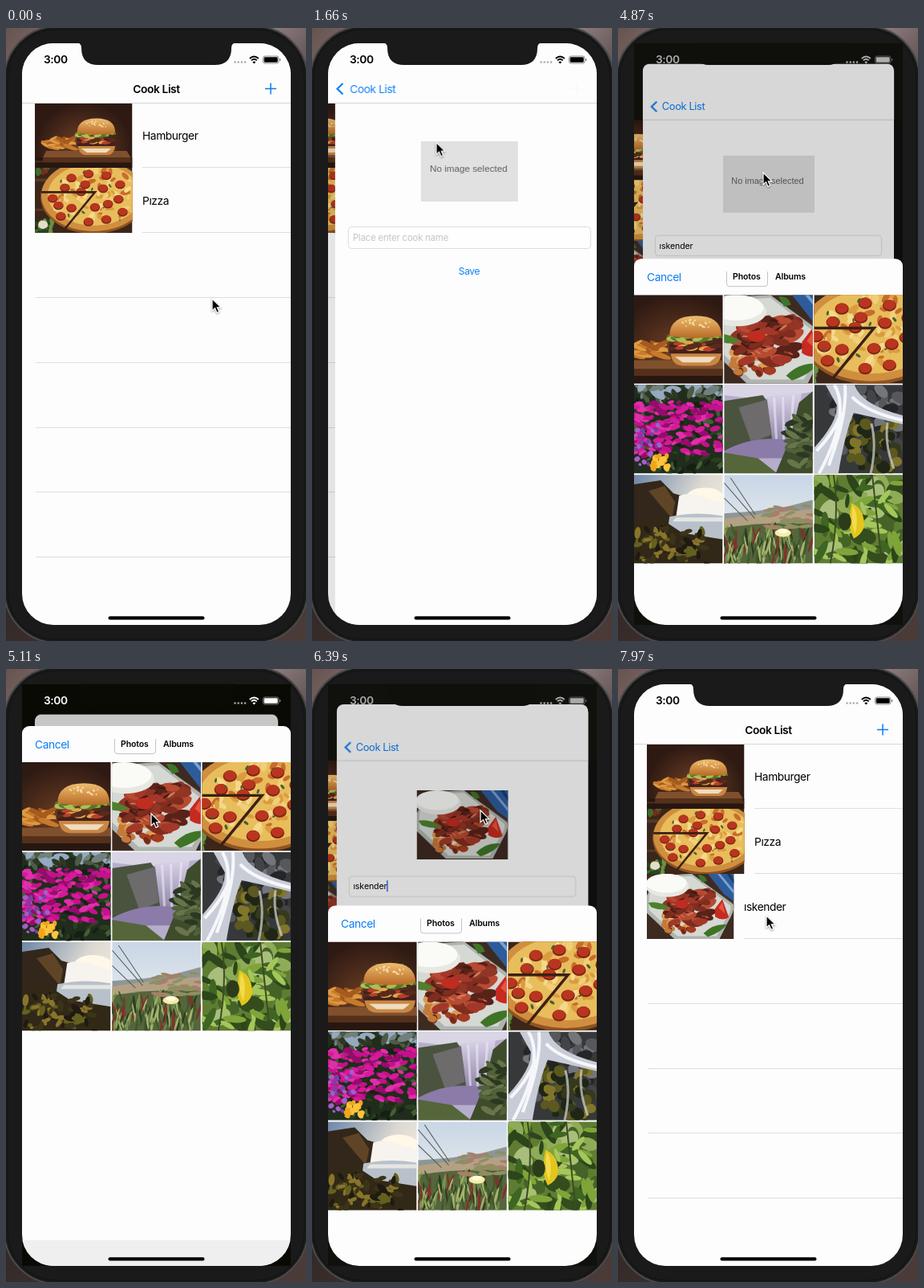
An HTML page for the animation above (8 s loop, 374 by 763 pixels).

```html
<!DOCTYPE html>
<html lang="en">
<head>
<meta charset="utf-8">
<title>Cook List</title>
<style>
  html, body { margin: 0; width: 100%; height: 100%; overflow: hidden; background: #1a1a1a; }
  svg { font-family: Inter, "Open Sans", sans-serif; }
  #stage { display: block; width: 100vw; height: 100vh; }
  .body { font-size: 13.75px; letter-spacing: -.4px; }
  .bold { font-size: 13.75px; letter-spacing: -.38px; font-weight: 600; }
  .small { font-size: 12.1px; letter-spacing: -.4px; }
  .field { font-size: 11.3px; letter-spacing: -.15px; }
  .tab { font-size: 10.5px; letter-spacing: -.12px; font-weight: 600; }
  .hint { font: 11.7px "Liberation Sans", Arial, sans-serif; }
  .blue { fill: #0a7df5; }
  .line { stroke: #dededf; fill: none; }
</style>
</head>
<body>
<svg id="stage" viewBox="0 0 374 763" xmlns="http://www.w3.org/2000/svg">
  <defs>
    <linearGradient id="desk" x2=".6" y2="1">
      <stop offset="0" stop-color="#66534f"/><stop offset=".3" stop-color="#b9a3a6"/><stop offset=".6" stop-color="#2c2422"/><stop offset="1" stop-color="#4a3a38"/>
    </linearGradient>
    <radialGradient id="wall"><stop offset="0" stop-color="#754225"/><stop offset="1" stop-color="#2e1a13"/></radialGradient>
    <linearGradient id="bun" x2="0" y2="1"><stop offset="0" stop-color="#efbd70"/><stop offset="1" stop-color="#b86a26"/></linearGradient>
    <linearGradient id="dusk" x2="1" y2=".5"><stop offset="0" stop-color="#6d86a8"/><stop offset=".6" stop-color="#dcd9d2"/><stop offset="1" stop-color="#f4ede0"/></linearGradient>
    <linearGradient id="fall" x2="0" y2="1"><stop offset="0" stop-color="#d9d3e8"/><stop offset="1" stop-color="#8d82a6"/></linearGradient>
    <linearGradient id="haze" x2="0" y2="1"><stop offset="0" stop-color="#c9d6e6"/><stop offset="1" stop-color="#f3f3f0"/></linearGradient>
    <clipPath id="screen"><rect x="20" y="19" width="335" height="724" rx="39"/></clipPath>
    <path id="notch" d="M89 18.500Q94 19 94 25Q94 46 115 46H260Q281 46 281 25Q281 19 286 18.500Z"/>
  </defs>

  <rect width="374" height="763" fill="url(#desk)"/>
  <rect x="-2" y="-2" width="378" height="767" rx="65" fill="#1a1a1a" stroke="#4b4a4a" stroke-width="2"/>
  <rect x="2" y="2" width="370" height="759" rx="60" fill="none" stroke="#111"/>
  <rect id="dark" x="20" y="19" width="335" height="724" fill="#0b0b06"/>

  <g clip-path="url(#screen)">
    <g id="page">
      <rect x="20" y="19" width="335" height="724" rx="10" fill="#fdfdfd"/>
      <g id="list">
        <path class="line" d="M170 173.500H355M170 254.500H355M37 416.500H355M37 497.500H355M37 577.500H355M37 658.500H355"/>
        <path id="oldLine" class="line" d="M37 335.500H355"/>
        <use href="#burger" x="36" y="93.500" width="121.500" height="80.500"/>
        <use href="#pizza" x="36" y="174" width="121.500" height="81"/>
        <text class="body" x="170" y="139">Hamburger</text>
        <text class="body" x="170" y="219.500">Pızza</text>
        <g id="newRow">
          <path class="line" d="M157 335.500H355"/>
          <use href="#kebab" x="36" y="255" width="108.500" height="81"/>
          <text class="body" x="157" y="300.500">ıskender</text>
        </g>
        <rect id="shade" x="20" y="93" width="500" height="650" fill="#000"/>
      </g>
      <g id="detail">
        <rect x="20" y="93" width="335" height="650" fill="#fdfdfd"/>
        <g id="empty">
          <rect x="127" y="141" width="121" height="75" fill="#e1e1e1"/>
          <text class="hint" x="138" y="179" fill="#606060">No image selected</text>
        </g>
        <use id="chosen" href="#kebab" x="127" y="133" width="121" height="91"/>
        <rect x="36.500" y="247.500" width="302" height="27" rx="4" fill="#fefefe" stroke="#dcdcdc"/>
        <text id="prompt" class="field" x="42" y="265" fill="#c3c3c6">Place enter cook name</text>
        <text id="typed" class="field" x="42" y="265"></text>
        <rect id="caret" x="42" y="253" width="1.600" height="15" fill="#3f6be0"/>
        <text class="small blue" x="187" y="307" text-anchor="middle">Save</text>
      </g>
      <path d="M20 93V29Q20 19 30 19H345Q355 19 355 29V93Z" fill="#fdfdfd"/>
      <path id="tint" d="M20 93V29Q20 19 30 19H341V86Q341 93 348 93Z" fill="#f6f6f6"/>
      <path d="M20 93.500H355" stroke="#d6d6d8"/>
      <g id="listNav">
        <text class="bold" x="187.500" y="80.500" text-anchor="middle">Cook List</text>
      </g>
      <path id="plus" d="M323 75.500H337M330 68.500V82.500" stroke="#0a7df5" stroke-width="1.500"/>
      <path id="chevron" d="M38.500 69L31.500 75.700L38.500 82.500" fill="none" stroke="#0a7df5" stroke-width="2.200"/>
      <text id="back" class="body blue" x="45.500" y="80.500">Cook List</text>
      <rect id="dim" x="20" y="19" width="335" height="724" rx="10" fill="#000"/>
    </g>

    <g id="sheet">
      <rect x="20" y="66" width="335" height="760" rx="9" fill="#fdfdfd"/>
      <text class="body blue" x="36" y="93.500">Cancel</text>
      <path d="M135.500 82V97Q135.500 100.500 139 100.500H183Q186.500 100.500 186.500 97V82" fill="none" stroke="#c4c4c6"/>
      <text class="tab" x="143" y="92">Photos</text>
      <text class="tab" x="196" y="92">Albums</text>
      <g id="grid"></g>
      <rect id="toolbar" x="20" y="716" width="335" height="90" fill="#efefef"/>
    </g>
  </g>

  <use href="#notch" fill="#1a1a1a"/>
  <use id="darkNotch" href="#notch" fill="#0b0b06"/>
  <g id="status" fill="currentColor">
    <text class="bold" x="47" y="44">3:00</text>
    <path d="M285.500 42.500h0M289.700 42.500h0M293.900 42.500h0M298.100 42.500h0" stroke="#aaa" stroke-width="2.600" stroke-linecap="round"/>
    <path d="M303.800 38Q309.300 33 314.800 38M305.900 40.400Q309.300 37.300 312.700 40.400" fill="none" stroke="currentColor" stroke-width="1.900"/>
    <path d="M307.300 42.200Q309.300 40.600 311.300 42.200L309.300 44.400Z"/>
    <rect x="320.500" y="35" width="19.500" height="9" rx="2.500" fill="none" stroke="currentColor" stroke-opacity=".45"/>
    <rect x="321.700" y="36.200" width="17" height="6.600" rx="1.400"/>
    <rect x="341" y="38" width="1.300" height="3" rx=".6" opacity=".5"/>
  </g>
  <rect x="127.500" y="732.300" width="120" height="4.200" rx="2.100"/>
  <path id="cursor" d="M0 0V15L3.500 11.800L6 17.400L8.700 16.200L6.300 10.800H11Z" stroke="#fff" stroke-width="1.200" style="filter:drop-shadow(0 1px 1px #0006)"/>
</svg>

<script>
const LOOP = 8000;
const $ = id => document.getElementById(id);

// Seeded ellipses strewn over a box
function scatter(seed, n, [x, y, w, h], [rx, ry], colors, tilt = 180) {
  const rnd = () => (seed = (seed * 16807) % 2147483647) / 2147483647;
  rnd();
  let out = '';
  for (let i = 0; i < n; i++) {
    const cx = x + rnd() * w, cy = y + rnd() * h, k = .6 + rnd() * .7;
    out += `<ellipse rx="${rx * k}" ry="${ry * k}" fill="${colors[i % colors.length]}"
      transform="translate(${cx} ${cy}) rotate(${(rnd() - .5) * tilt})"/>`;
  }
  return out;
}
const fill = (color, d) => `<path fill="${color}" d="${d}"/>`;
const oval = (color, cx, cy, rx, ry = rx) => `<ellipse fill="${color}" cx="${cx}" cy="${cy}" rx="${rx}" ry="${ry}"/>`;
const backdrop = color => fill(color, 'M0 0H120V110H0Z');

const pepperoni = [[45, 12], [66, 7], [88, 9], [105, 20], [62, 20], [84, 25], [103, 38], [37, 24], [57, 29],
  [90, 44], [74, 48], [108, 54], [88, 63], [66, 66], [29, 46], [45, 49], [32, 59], [22, 37]];

const photos = {
  burger: [120, 80, backdrop('url(#wall)') + fill('#271711', 'M0 67H120V80H0Z') +
    fill('#4d2d1b', 'M0 71H120V73H0Z') + fill('#80502d', 'M14 59H113L118 67H10Z') + fill('#54301b', 'M10 67H118V73H10Z') +
    scatter(7, 26, [12, 44, 36, 12], [8, 2], ['#c77a2b', '#dd9a42', '#a65a1e'], 70) +
    fill('#c98744', 'M53 52H99Q98 64 88 64H64Q54 64 53 52Z') + fill('#f0dcc0', 'M57 56H94L88 61H64Z') +
    fill('#43201a', 'M52 44H99V53H52Z') + scatter(5, 14, [53, 42, 45, 7], [5, 1.8], ['#b8402a', '#5a2a1c', '#e0a94b'], 30) +
    scatter(3, 24, [52, 36, 47, 5], [5, 2.2], ['#8aa83a', '#587527', '#a9bf58'], 60) +
    fill('url(#bun)', 'M52 37Q52 19 76 19Q99 19 99 37Q76 41 52 37Z') +
    scatter(9, 14, [62, 21, 27, 9], [1.2, .7], ['#f8dfa5'])],
  pizza: [120, 80, backdrop('#3b2619') + fill('#563923', 'M0 13H120V17H0ZM0 50H120V53H0Z') +
    scatter(11, 20, [0, 66, 24, 14], [5, 2.5], ['#3f6b2c', '#26461f', '#6d8e46']) + oval('#e4ddcb', 10, 70, 6, 5) +
    scatter(12, 5, [2, 1, 20, 6], [5, 2.5], ['#3f6b2c', '#7d2a1c']) +
    oval('#8f5320', 72, 36, 65, 45) + oval('#cf8f3f', 72, 34, 64, 44) + oval('#e8bd5c', 73, 33, 57, 38) +
    scatter(17, 70, [25, 2, 94, 60], [5, 2.5], ['#f4d98a', '#db9c3f', '#f0cf78', '#c96c2c']) +
    pepperoni.map(([x, y]) => oval('#7e2114', x, y + .7, 6.2, 5.200) + oval('#b9351f', x, y, 5.500, 4.500)).join('') +
    scatter(19, 12, [28, 5, 85, 60], [2, 1], ['#47642a']) +
    '<path d="M8 30L74 30L37 75" fill="none" stroke="#3b2014" stroke-width="2.500"/>'],
  kebab: [120, 90, backdrop('#3d2b22') + fill('#5a3f30', 'M60 0L120 40V48L46 0Z') +
    fill('#2d5c9c', 'M84 0H120V38L106 28Z') + fill('#7ba1d0', 'M97 0H101L120 23V28Z') + fill('#173b70', 'M110 0H115L120 8V14Z') +
    fill('#aeb4af', 'M0 30L14 3L62 0L119 42Q122 50 112 66L100 90H38L0 54Z') +
    fill('#d5d8d3', 'M3 30L16 6L62 3L115 44Q118 50 108 64L96 86H42L3 50Z') +
    scatter(23, 34, [24, 55, 56, 25], [5, 3.500], ['#c47938', '#a53b21', '#dc9b51', '#722b1a']) +
    scatter(29, 75, [30, 23, 57, 45], [10, 4.500], ['#7f2d1f', '#a3382a', '#592219', '#b74a32', '#913525'], 80) +
    scatter(31, 16, [32, 26, 52, 38], [4, 1], ['#cf7858', '#40180f'], 80) +
    oval('#e7e8e2', 28, 17, 30, 15) + oval('#fafaf7', 27, 13, 28, 13) +
    fill('#4e802f', 'M2 40Q16 37 32 47Q22 52 6 46Z') + fill('#3f7427', 'M78 82Q92 68 110 70Q104 80 84 87Z') +
    fill('#3f7427', 'M70 2Q80 0 83 10L76 12Z') + fill('#c62a20', 'M94 48L104 35L113 60Q104 66 94 59Z') +
    fill('#e4573f', 'M99 47L104 39L108 55Z') + oval('#bf2c20', 48, 42, 9, 6)],
  flowers: [110, 110, backdrop('#202c1c') + scatter(37, 40, [0, 0, 110, 16], [9, 4], ['#4d5b46', '#71807c', '#2c3824', '#95a9c0']) +
    scatter(41, 90, [0, 18, 110, 92], [6, 2.500], ['#28401f', '#152013', '#455d35']) +
    scatter(43, 175, [0, 20, 110, 67], [5.500, 2.800], ['#c4128c', '#e02fab', '#970b6e', '#d51a9b'], 60) +
    scatter(45, 24, [0, 50, 32, 50], [3, 2.500], ['#a35fc7', '#7a3fa5']) +
    scatter(47, 18, [20, 88, 22, 17], [4, 3], ['#f0a51e', '#ffc43b'])],
  falls: [110, 110, backdrop('#b6adcc') + fill('#d9d5e4', 'M0 0H110V9L45 18L0 13Z') +
    fill('#49533e', 'M0 20L48 13L60 30L62 78L0 82Z') + fill('#6d6b6c', 'M18 28L54 18L58 62L34 72Z') +
    fill('url(#fall)', 'M53 15L96 10L88 72H60Z') +
    '<path d="M62 16L65 70M73 15L74 70M86 13L82 70" stroke="#efeaf6" stroke-width="3" opacity=".6"/>' +
    fill('#8b7ba8', 'M0 82Q40 60 88 70L75 91H0Z') + fill('#3e4c2c', 'M110 8L93 22L83 64L64 110H110Z') +
    fill('#55663a', 'M0 84L42 91L66 110H0Z') + scatter(53, 38, [78, 40, 32, 66], [8, 3], ['#516139', '#2b3821', '#68754a'], 90)],
  stream: [110, 110, backdrop('#37383a') + scatter(59, 55, [20, 0, 90, 80], [10, 6], ['#56585b', '#242527', '#73757a', '#424447']) +
    scatter(61, 50, [42, 42, 60, 65], [6, 7], ['#5b5820', '#35391d', '#81752a', '#202616']) +
    fill('#c8ccd6', 'M14 0H50Q58 25 110 38V49Q72 40 49 35Q38 60 30 110H0V78Q30 45 28 25Z') +
    '<path d="M25 0Q46 36 6 110M38 0Q42 35 18 100M47 15Q65 34 110 44M3 82Q26 58 34 34" fill="none" stroke="#f6f7fb" stroke-width="4"/>' +
    '<path d="M71 48Q78 76 70 110M91 47Q87 74 99 104" fill="none" stroke="#d5d8dc" stroke-width="3" opacity=".7"/>'],
  sunset: [110, 110, backdrop('url(#dusk)') + oval('#fff8e8', 88, 29, 24, 13) +
    fill('#33271b', 'M0 12L33 7L49 23L63 27L58 58L0 72Z') + fill('#604426', 'M18 20L38 14L51 34L47 54L33 38Z') +
    fill('#f7f4ef', 'M56 26Q72 21 88 28L110 35V53H52Z') + fill('#b8c1ca', 'M44 52Q78 45 110 51V82H40Z') +
    fill('#e5e6e3', 'M52 53H110V58H48Z') + fill('#312817', 'M0 62L34 55L60 72L110 80V110H0Z') +
    scatter(67, 70, [0, 66, 92, 44], [6, 3], ['#64601f', '#3b3418', '#88742b', '#201a12'])],
  dunes: [110, 110, backdrop('url(#haze)') + fill('#8e9696', 'M0 48L40 45L80 39L110 31V68H0Z') +
    fill('#b3a184', 'M0 55Q40 48 110 43V78H0Z') + fill('#55653c', 'M0 66Q50 58 110 60V110H0Z') +
    scatter(71, 130, [0, 66, 110, 44], [1.300, 10], ['#3d5a2a', '#789150', '#83302b', '#a5b36d', '#2c3d20'], 50) +
    scatter(73, 26, [50, 38, 60, 27], [8, 2], ['#8a9160', '#a77f68'], 40) +
    '<path d="M0 10L38 54M8 4L39 50M0 29L29 57" stroke="#555a5a" fill="none"/>' +
    oval('#f3ecaa', 73, 72, 10, 5) + oval('#fffbd9', 73, 70, 6, 3)],
  leaves: [110, 110, backdrop('#5f7d32') + scatter(79, 36, [0, 0, 110, 110], [14, 9], ['#8fab58', '#456326', '#a9be7c', '#334d1d']) +
    scatter(83, 60, [0, 0, 110, 110], [13, 4], ['#7fa43a', '#3e6522', '#a5c65b', '#2c451a']) +
    '<path d="M24 0Q32 50 20 110M72 0L84 110" stroke="#3c4b22" stroke-width="2" fill="none"/>' +
    fill('#e3c51e', 'M46 35Q63 42 62 65Q58 75 49 79Q42 65 44 52Z') + fill('#f2dc4c', 'M48 38Q56 50 51 73Q44 60 48 38Z') +
    oval('#2c3c1b', 38, 58, 8, 11)]
};
$('stage').querySelector('defs').innerHTML += Object.entries(photos).map(([id, [w, h, art]]) =>
  `<symbol id="${id}" viewBox="0 0 ${w} ${h}" preserveAspectRatio="xMidYMid slice">${art}</symbol>`).join('');
$('grid').innerHTML = ['burger', 'kebab', 'pizza', 'flowers', 'falls', 'stream', 'sunset', 'dunes', 'leaves'].map((id, i) =>
  `<use href="#${id}" x="${20 + i % 3 * 112.3}" y="${111 + Math.floor(i / 3) * 112}" width="110.500" height="110.300"/>`).join('');

const play = (el, keys) => el.animate(keys, { duration: LOOP, iterations: Infinity });
const shift = (x, y = 0) => ({ transform: `translate(${x}px, ${y}px)` });
const fade = opacity => ({ opacity });

// Rows: [ms, value, easing to the next row]
function tween(el, style, rows) {
  const all = [[0, rows[0][1]], ...rows, [LOOP, rows.at(-1)[1]]];
  play(el, all.map(([ms, v, easing = 'linear']) => ({ offset: ms / LOOP, easing, ...style(...[].concat(v)) })));
}
const steps = (el, style, rows) => tween(el, style, rows.map(([ms, v]) => [ms, v, 'step-end']));

// Two critically damped moves: there at `go`, back at `home`
function spring(el, style, from, to, [go, home, rate]) {
  const rows = [];
  for (const [start, a, b] of [[go, from, to], [home, to, from]]) {
    for (let d = 0; d <= 800; d += 20) {
      const x = rate * d / 1000, p = d < 800 ? 1 - (1 + x) * Math.exp(-x) : 1;
      rows.push([start + d, a + (b - a) * p]);
    }
  }
  tween(el, style, rows);
}

const push = [1270, 7150, 14.1], modal = [4750, 6330, 19.4];
spring($('list'), shift, 0, -100, push);
spring($('shade'), fade, 0, .1, push);
spring($('detail'), shift, 335, 0, push);
spring($('listNav'), p => ({ opacity: Math.max(0, 1 - 1.6 * p), ...shift(-112 * p) }), 0, 1, push);
spring($('plus'), fade, 1, 0, push);
spring($('chevron'), fade, 0, 1, push);
spring($('back'), p => ({ opacity: p, ...shift(60 * (1 - p)) }), 0, 1, push);

spring($('sheet'), y => shift(0, y), 690, 0, modal);
spring($('page'), p => ({ transform: `translate(${18.2 * p}px, ${39.8 * p}px) scale(${1 - .097 * p})` }), 0, 1, modal);
for (const id of ['dark', 'darkNotch']) spring($(id), fade, 0, 1, modal);
spring($('dim'), fade, 0, .22, modal);
spring($('status'), p => ({ color: `rgb(${[0, 0, 0].fill(Math.round(255 * p))})` }), 0, 1, modal);
tween($('toolbar'), y => shift(0, y), [[5110, -10], [5540, 0]]);

steps($('tint'), fade, [[0, 0], [2040, 1], [4800, 0]]);
steps($('newRow'), fade, [[0, 0], [3000, 1]]);
steps($('oldLine'), fade, [[0, 1], [3000, 0]]);
steps($('empty'), fade, [[0, 1], [5600, 0]]);
steps($('chosen'), fade, [[0, 0], [5600, 1]]);
steps($('prompt'), fade, [[0, 1], [3140, 0]]);

// Typing
const word = 'ıskender', typed = $('typed');
const keyTimes = [3140, 3260, 3410, 3500, 3590, 3690, 3780, 3870];
typed.innerHTML = [...word].map(c => `<tspan>${c}</tspan>`).join('');
steps($('caret'), shift, [[0, 0], ...keyTimes.map((ms, i) => [ms, typed.getSubStringLength(0, i + 1)])]);
[...typed.children].forEach((el, i) => steps(el, v => ({ fillOpacity: v }), [[0, 0], [keyTimes[i], 1]]));
tween($('caret'), fade, [[2200, 0], [2230, 1], [2880, 1], [3000, 0], [3130, 0], [3140, 1], [4380, 1], [4500, 0], [5600, 0], [5601, 1]]);

const smooth = 'ease-in-out';
tween($('cursor'), shift, [
  [330, [257, 337], smooth], [1020, [328, 76]], [1290, [328, 76], 'ease-in'], [1660, [155, 142], 'ease-out'],
  [2050, [139, 255]], [2340, [137, 261]], [4180, [137, 261], smooth], [4510, [181, 180]],
  [5200, [181, 180], smooth], [5540, [236, 164], 'ease-out'], [5770, [207, 157]],
  [6330, [207, 157], smooth], [6700, [261, 500]], [6810, [255, 493], smooth], [7120, [187, 304]],
  [7940, [184, 306]], [7970, [185, 307]]
]);
</script>
</body>
</html>
```
